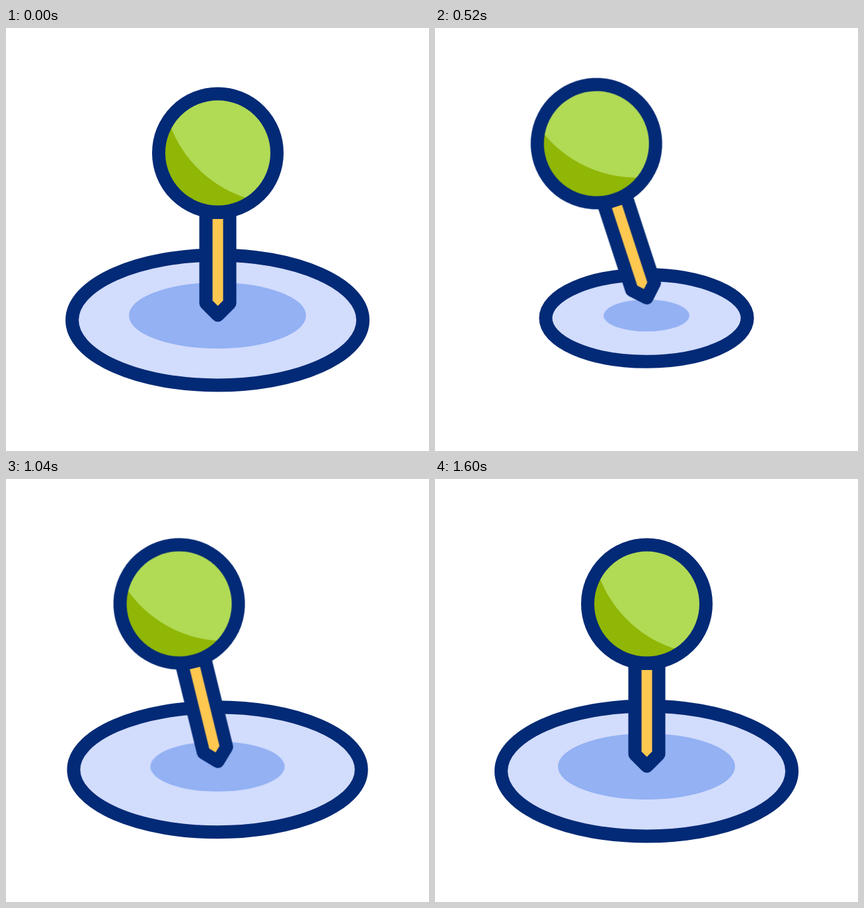
An HTML page without scripts for the animation above (3 s loop, 640 by 640 pixels).

```html
<!DOCTYPE html>
<html lang="en">
<head>
<meta charset="utf-8">
<title>Pin drop</title>
<style>
  html, body { margin: 0; height: 100%; overflow: hidden; background: #fff; }
  svg { display: block; width: 100vw; height: 100vh; }

  .line { stroke: #032a76; stroke-width: 20; stroke-linejoin: round; }
  .ring, .pool, .lift, .tilt, .spark {
    animation: 3s cubic-bezier(.333, 0, .667, 1) infinite;
  }
  .ring { fill: #d2dcfd; animation-name: ring; }
  .pool { fill: #93b1f3; transform-origin: 320px 435px; animation-name: pool; }
  .lift { animation-name: lift; }
  .tilt { transform-origin: 320.5px 434.5px; animation-name: tilt; }
  .spark {
    stroke: #ff6150; stroke-width: 18; stroke-linecap: round;
    opacity: 0; animation-name: spark; animation-timing-function: linear;
  }

  /* Shrinks, snaps wide on impact, then settles */
  @keyframes ring {
    0% { rx: 220px; ry: 98.5px; cy: 442px; animation-timing-function: cubic-bezier(.333, 0, .667, 0); }
    17.333% { rx: 153px; ry: 66px; cy: 439px; animation-timing-function: cubic-bezier(.333, .667, .667, 1); }
    27.333%, 28% { rx: 85px; ry: 32.5px; cy: 436.3px; }
    37.167% { rx: 246.5px; ry: 108px; cy: 440.5px; }
    40.667% { rx: 212px; ry: 94px; cy: 440.8px; }
    53.333%, 100% { rx: 220px; ry: 98.5px; cy: 442px; }
  }
  @keyframes pool {
    0%, 3.333% { transform: scale(1); }
    21% { transform: scale(.42); }
    45.667%, 100% { transform: scale(1); }
  }
  @keyframes lift {
    0% { transform: translateY(0); animation-timing-function: cubic-bezier(.333, 0, .667, 0); }
    17.333% { transform: translateY(-26px); animation-timing-function: cubic-bezier(.333, .667, .667, 1); }
    27.333%, 27.833% { transform: translateY(-56.5px); }
    36.667%, 100% { transform: translateY(0); }
  }
  @keyframes tilt {
    0%, 1.667% { transform: rotate(0); }
    21.067%, 30.667% { transform: rotate(-20deg); }
    42.167% { transform: rotate(2deg); }
    53.333%, 100% { transform: rotate(0); }
  }
  /* The head runs out first, the tail catches up */
  @keyframes spark {
    0%, 35.99% { opacity: 0; stroke-dasharray: 0 300; stroke-dashoffset: 0; }
    36% { opacity: 1; stroke-dasharray: 0 300; stroke-dashoffset: 0; }
    38.667% { stroke-dasharray: 67 300; stroke-dashoffset: -10; }
    40.667% { stroke-dasharray: 70 300; stroke-dashoffset: -29; }
    45.333% { stroke-dasharray: 14 300; stroke-dashoffset: -85; }
    46.3% { opacity: 1; stroke-dasharray: 1 300; stroke-dashoffset: -98; }
    46.31%, 100% { opacity: 0; stroke-dasharray: 1 300; stroke-dashoffset: -98; }
  }
</style>
</head>
<body>
<svg viewBox="0 0 640 640">
  <ellipse class="ring line" cx="320" cy="442" rx="220" ry="98.5"/>
  <ellipse class="pool" cx="320" cy="435" rx="134" ry="50"/>
  <path class="spark" pathLength="100" d="M291 445.5L260 426"/>
  <path class="spark" pathLength="100" d="M350 446L381 427"/>
  <g class="lift">
    <g class="tilt">
      <path class="line" fill="#ffc850" d="M302.5 279V416.5L320.5 434.5L338.5 416.5V279Z"/>
      <circle cx="320.5" cy="189" r="89.5" fill="#b1da55"/>
      <path fill="#90b606" d="M247.8 145.4A180 180 0 0 0 369.7 258.8A86 86 0 0 1 247.8 145.4Z"/>
      <circle class="line" cx="320.5" cy="189" r="89.5" fill="none"/>
    </g>
  </g>
</svg>
</body>
</html>
```
